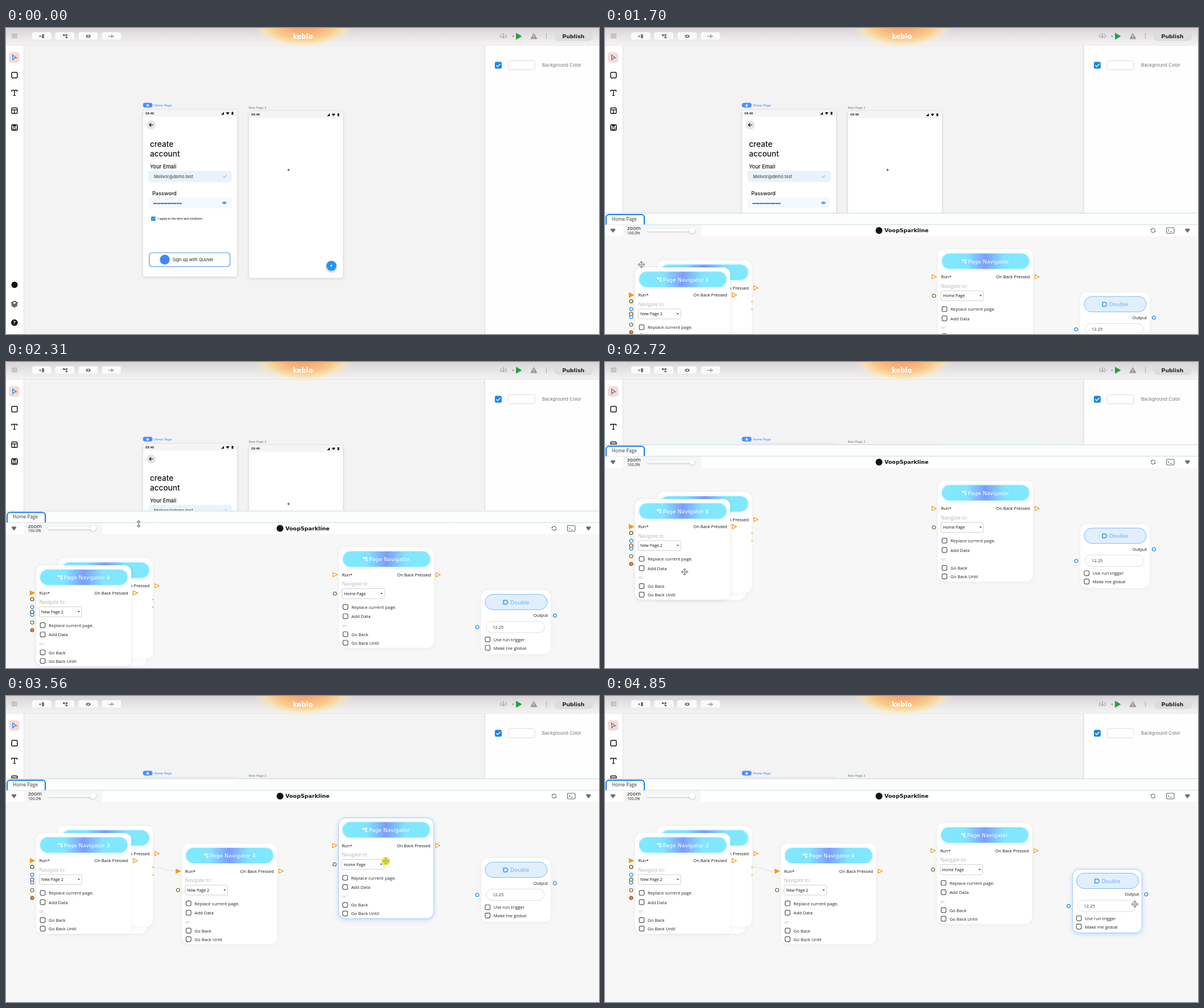
An HTML page with a canvas that plays this animation: 1042 by 538 pixels, repeating every 4.92 s.

```html
<!DOCTYPE html>
<html lang="en">
<head>
<meta charset="utf-8">
<title>Page builder</title>
<style>
html, body { margin: 0; width: 100%; height: 100%; overflow: hidden; background: #f3f3f3; }
canvas { display: block; width: 100vw; height: 100vh; }
</style>
</head>
<body>
<canvas id="stage" width="1042" height="538"></canvas>
<script>
const W = 1042, H = 538, LOOP = 4920, TAU = Math.PI * 2;
const UI = '"Open Sans", sans-serif', APP = 'Inter, sans-serif', WIDE = '"DejaVu Sans", sans-serif';
const BLUE = '#1a86e8', ORANGE = '#f59a12', INK = '#111', GREY = '#8a8a8a';
const screen = document.getElementById('stage').getContext('2d');
const backdrop = document.createElement('canvas');
backdrop.width = W;
backdrop.height = H;
let g = backdrop.getContext('2d');

// y is the middle of the capital letters
function text(s, x, y, size, { color = INK, font = UI, weight = 400, align = 'left' } = {}) {
  g.font = `${weight} ${size}px ${font}`;
  g.fillStyle = color;
  g.textAlign = align;
  g.fillText(s, x, y + size * 0.36);
}
function paint(fill, stroke, width = 1) {
  if (fill) { g.fillStyle = fill; g.fill(); }
  if (stroke) { g.strokeStyle = stroke; g.lineWidth = width; g.stroke(); }
}
function box(x, y, w, h, r, fill, stroke, width) {
  g.beginPath();
  g.roundRect(x, y, w, h, r);
  paint(fill, stroke, width);
}
function disc(x, y, r, fill, stroke, width) {
  g.beginPath();
  g.arc(x, y, r, 0, TAU);
  paint(fill, stroke, width);
}
function path(points, { fill, stroke, width, close = false } = {}) {
  g.beginPath();
  points.forEach(([x, y]) => g.lineTo(x, y));
  if (close) g.closePath();
  paint(fill, stroke, width);
}
const line = (points, stroke = INK, width = 1) => path(points, { stroke, width });
const shape = (points, fill, stroke, width) => path(points, { fill, stroke, width, close: true });
function at(x, y, draw) {
  g.save();
  g.translate(x, y);
  draw();
  g.restore();
}
function shadowed(color, blur, dy, draw) {
  g.save();
  g.shadowColor = color;
  g.shadowBlur = blur;
  g.shadowOffsetY = dy;
  draw();
  g.restore();
}
function plus(x, y, r, color, width) {
  line([[x - r, y], [x + r, y]], color, width);
  line([[x, y - r], [x, y + r]], color, width);
}
function tick(x, y, r, color, width = 1.3) {
  line([[x - r, y], [x - r * 0.3, y + r * 0.7], [x + r, y - r * 0.7]], color, width);
}

function nodesIcon(color) {
  line([[-2.5, -2], [2.5, -2]], color, 0.9);
  line([[-2.5, -2], [2.2, 2.2]], color, 0.9);
  for (const [x, y] of [[-4, -3.5], [0.8, -3.5], [0.8, 0.8]]) box(x, y, 3.2, 3, 0.8, color);
}

function topBar() {
  const shade = g.createLinearGradient(0, 0, 0, 30);
  shade.addColorStop(0, '#d8d3d7');
  shade.addColorStop(0.5, '#e7e4e6');
  shade.addColorStop(1, '#f4f3f3');
  g.fillStyle = shade;
  g.fillRect(0, 0, W, 30);
  g.fillStyle = '#e2e2e2';
  g.fillRect(0, 30, W, 0.8);

  at(523, -8, () => {
    g.scale(1, 0.48);
    const sun = g.createRadialGradient(0, 0, 0, 0, 0, 92);
    sun.addColorStop(0, '#ef9a6e');
    sun.addColorStop(0.35, '#f5b27c');
    sun.addColorStop(0.6, '#f8c98c');
    sun.addColorStop(0.78, 'rgba(251,224,165,.75)');
    sun.addColorStop(0.9, 'rgba(252,236,195,.25)');
    sun.addColorStop(1, 'rgba(252,238,205,0)');
    g.fillStyle = sun;
    g.fillRect(-95, 16, 190, 100);
  });
  text('keblo', 521.5, 15, 11.5, { color: '#fff', font: WIDE, weight: 700, align: 'center' });

  for (const y of [11, 14, 17]) line([[10, y], [20, y]], GREY, 1);
  for (const x of [46, 86.5, 127.5, 168.5]) box(x, 7.5, 33.5, 13, 3, '#fbfafa');
  plus(60, 14.5, 2, '#666', 1);
  box(63, 11, 4, 7, 1, '#777');
  at(104, 14.5, () => nodesIcon('#666'));
  g.beginPath();
  g.ellipse(144.5, 14.5, 4.2, 2.8, 0, 0, TAU);
  paint('#777');
  disc(144.5, 14.5, 1.2, '#fff');
  line([[180, 14.5], [190, 14.5]], '#777', 1);
  line([[186, 11], [186, 18]], '#777', 1);

  line([[871, 11], [868, 14.5], [871, 18]], GREY, 1);
  line([[877, 11], [880, 14.5], [877, 18]], GREY, 1);
  line([[874, 9], [874, 17]], GREY, 1);
  line([[871.5, 14.5], [874, 17.5], [876.5, 14.5]], GREY, 1);
  disc(891, 14.5, 1.3, GREY);
  shape([[896.5, 9], [906, 14.5], [896.5, 20]], '#1da53c', '#1da53c', 0.8);
  shape([[927.5, 9.5], [933, 19], [922, 19]], '#999', '#999', 1);
  line([[927.5, 12.5], [927.5, 16]], '#fff', 1);
  disc(927.5, 17.6, 0.6, '#fff');
  line([[949.5, 9], [949.5, 19.5]], '#aaa', 1);
  box(963.5, 6, 68, 17, 8.5, '#dedddd');
  text('Publish', 997, 14.7, 9.4, { color: '#222', font: WIDE, weight: 700, align: 'center' });
}

function sidebars() {
  g.fillStyle = '#fff';
  g.fillRect(0, 30, 31, H);
  g.fillStyle = '#fefefe';
  g.fillRect(841, 30, 201, H);
  line([[31.5, 30], [31.5, H]], '#e0e0e0');
  line([[841, 30], [841, H]], '#cfcfcf');

  box(5, 42.5, 18.5, 18.5, 5, '#fbd9d0');
  shape([[11.5, 47.5], [18.5, 52.5], [14.7, 53], [12, 56]], null, BLUE, 1.2);
  box(10, 78, 9.8, 9.8, 1.5, null, INK, 1.5);
  line([[10, 112], [10, 109.5], [19.5, 109.5], [19.5, 112]], INK, 1.3);
  line([[14.8, 109.5], [14.8, 118.5]], INK, 1.4);
  line([[12.5, 118.5], [17, 118.5]], INK, 1.2);
  box(10, 140.5, 9.8, 9.8, 1.5, null, INK, 1.4);
  line([[10, 144], [19.8, 144]], INK, 1.3);
  line([[14.8, 144], [14.8, 150]], INK, 1.3);
  box(10, 170, 9.8, 9.8, 1.8, null, INK, 1.6);
  box(12.3, 170.5, 5, 3, 0.5, INK);
  box(12.3, 175.5, 5, 3, 0.5, null, INK, 1);
  disc(15, 451.5, 5.5, INK);
  shape([[14.8, 480.5], [20, 483.3], [14.8, 486], [9.6, 483.3]], null, INK, 1.2);
  for (const y of [485.5, 487.7]) line([[9.6, y], [14.8, y + 2.8], [20, y]], INK, 1.2);
  disc(14.8, 518, 5.8, INK);
  text('?', 14.8, 518, 8.5, { color: '#fff', weight: 700, align: 'center' });

  box(859, 59.5, 12, 12, 2.5, BLUE);
  tick(865, 65.5, 3.6, '#fff', 1.5);
  box(882.5, 57.5, 47, 16, 3, '#fff', '#dcdcdc');
  text('Background Color', 942, 65.5, 8.1, { color: '#777', font: APP });
}

function phone(x, y) {
  shadowed('rgba(0,0,0,.16)', 5, 1, () => box(x, y, 165, 293, 4, '#fff'));
  box(x, y, 165, 12, [4, 4, 0, 0], '#f5f5f5');
  text('08:46', x + 4, y + 6, 5.2, { font: APP, weight: 600 });
  shape([[x + 137, y + 8.5], [x + 142, y + 8.5], [x + 142, y + 3.5]], INK);
  shape([[x + 145.5, y + 4.8], [x + 148.5, y + 3.8], [x + 151.5, y + 4.8], [x + 148.5, y + 8.6]], INK);
  box(x + 155.5, y + 3.6, 3, 5, 0.6, INK);
}

function pages() {
  box(240.5, 131.5, 17, 8.3, 4.1, '#4a8ffc');
  shape([[249, 133.2], [251.5, 135.4], [251, 138], [247, 138], [246.5, 135.4]], '#cfe1ff');
  text('Home Page', 260, 136, 5.5, { color: '#3b83f6', font: WIDE });
  text('New Page 2', 426.5, 140, 5.3, { color: '#777', font: WIDE });
  phone(241, 144);
  phone(427, 146.5);

  const title = { font: APP, weight: 500 };
  disc(255, 170.5, 8, '#e5e5e5');
  line([[258.5, 170.5], [252, 170.5]], INK, 1.1);
  line([[255, 167.5], [252, 170.5], [255, 173.5]], INK, 1.1);
  text('create', 253, 204.6, 13.6, title);
  text('account', 253, 221.6, 13.6, title);
  text('Your Email', 253, 243.5, 9.2, title);
  box(250, 251, 147, 20, 5, '#eaf3fb');
  text('Melivor@demo.test', 260, 261, 7.5, { color: '#333', font: APP });
  tick(384.3, 261, 3, '#5c9fd8', 1);
  text('Password', 257, 291, 9.1, title);
  box(250, 298, 147, 19, 5, '#f5f9fd');
  text('*'.repeat(16), 259, 309.3, 8, { color: '#333', font: '"Liberation Sans", sans-serif', weight: 700 });
  g.beginPath();
  g.ellipse(383.8, 307.3, 4, 2.6, 0, 0, TAU);
  paint('#82b4e2');
  disc(383.8, 307.3, 1.2, '#4d8fcb');
  box(255, 331.5, 7.5, 7.5, 0.8, BLUE);
  tick(258.7, 335.2, 2.2, '#fff', 1);
  text('I agree to the term and condition.', 267, 335.3, 5.4, { font: '"Roboto", sans-serif' });
  box(251.7, 395, 142, 24.5, 5, '#fff', '#4b93e6', 1.2);
  disc(279, 407.2, 8.6, '#4285f4');
  text('Sign up with Quovel', 292.5, 407.3, 7.6, { font: APP, color: '#222' });

  plus(496.5, 249.5, 2.3, '#333', 0.9);
  shadowed('rgba(0,0,0,.3)', 4, 2, () => disc(571.8, 418, 8.8, '#2196f3'));
  plus(571.8, 418, 2.3, '#fff', 1);
}

function triangle(x, y, filled) {
  shape([[x, y - 3.6], [x + 7.5, y], [x, y + 3.6]], filled ? ORANGE : '#fffdf7', ORANGE, 1.2);
}
function port(x, y, color, fill = '#fff') {
  disc(x, y, 2.9, fill, color, 1.3);
}
function option(label, x, y) {
  box(x - 4.3, y - 4.3, 8.6, 8.6, 2.4, '#fff', '#555', 1.2);
  text(label, x + 10.5, y + 0.3, 7.8, { color: '#222' });
}
function card(x, y, w, h, selected) {
  shadowed(selected ? 'rgba(60,130,255,.3)' : 'rgba(0,0,0,.05)', 8, selected ? 2 : 1,
    () => box(x, y, w, h, 12, '#fff'));
  if (selected) box(x, y, w, h, 12, null, '#9cc6fb', 0.9);
}

function navigator(x, y, name, page, { wired = false, selected = false } = {}) {
  at(x, y, () => {
    card(0, 0, 167, 177, selected);
    const glow = g.createLinearGradient(7, 0, 160, 0);
    glow.addColorStop(0, '#80e9ff');
    glow.addColorStop(0.28, '#80e5ff');
    glow.addColorStop(0.5, '#7d9dfd');
    glow.addColorStop(0.72, '#80e5ff');
    glow.addColorStop(1, '#80e9ff');
    shadowed('rgba(90,210,255,.4)', 4, 0, () => box(7, 7.5, 153.5, 27, 13.5, glow));
    const titleX = name.length > 14 ? 49 : 53;
    at(titleX - 6.8, 21, () => nodesIcon('#fff'));
    text(name, titleX, 21.2, 9.4, { color: '#fff', font: WIDE });

    triangle(-10.5, 48.5, wired);
    triangle(170.5, 48.5);
    text('Run*', 5.5, 48.5, 7.6);
    text('On Back Pressed', 161.5, 48.5, 7.6, { align: 'right' });
    text('Navigate to:', 5.5, 64.5, 8.4, { color: '#b5b5b5' });
    box(5.5, 73, 74.5, 17.5, 2, '#fff', '#d2d2d2', 1);
    text(page, 9, 81.7, 7.15);
    shape([[73, 80.5], [77, 80.5], [75, 83]], '#444');
    port(-7, 81.7, '#8a6d3b');
    option('Replace current page.', 11.5, 105.2);
    option('Add Data', 11.5, 121.5);
    text('or:', 5.5, 137.5, 7.9, { color: '#b5b5b5' });
    option('Go Back', 11.5, 153);
    option('Go Back Until', 11.5, 168);
  });
}

function doubleNode(x, y, selected) {
  at(x, y, () => {
    card(0, 0, 122, 112, selected);
    box(7, 7, 109, 27, 13.5, '#e1effd', '#6fb1f5', 0.9);
    g.beginPath();
    g.roundRect(39.3, 17.3, 7.2, 7, [0.5, 3.5, 3.5, 0.5]);
    paint(null, '#4a9ff5', 1.8);
    text('Double', 51, 20.8, 9.4, { color: '#68adf6', font: WIDE });
    text('Output', 117, 44, 7.6, { align: 'right' });
    port(129.5, 44.3, '#2b93f3', '#e8f4ff');
    port(-7, 64.7, '#2b93f3', '#e8f4ff');
    box(9, 54.5, 102, 20, 10, '#fff', '#dedede', 1);
    text('12.25', 20, 64.6, 7.6, { color: '#333' });
    option('Use run trigger', 11.3, 86.3);
    option('Make me global', 11.3, 101);
  });
}

function lightningHeader() {
  g.fillStyle = '#fcfefe';
  g.fillRect(0, 0, W, 21);
  g.fillStyle = '#fff';
  g.fillRect(0, 21, W, 20);
  g.fillStyle = '#f6f6f6';
  g.fillRect(32, 21, 137, 20);
  line([[0, 0.5], [W, 0.5]], '#cbd8de');
  line([[0, 20.8], [W, 20.8]], '#cbdcdf');
  g.beginPath();
  g.moveTo(2, 20.5);
  g.arcTo(2, 3, 8, 3, 5);
  g.arcTo(69, 3, 69, 9, 5);
  g.lineTo(69, 20.5);
  paint('#fff', '#1677f0', 2);
  text('Home Page', 12, 11, 8.2, { color: '#333' });

  for (const x of [14, 1023.5]) {
    g.beginPath();
    g.moveTo(x - 4.5, 29.5);
    g.quadraticCurveTo(x - 2.5, 26.5, x, 28);
    g.quadraticCurveTo(x + 2.5, 26.5, x + 4.5, 29.5);
    g.lineTo(x, 35);
    g.closePath();
    paint('#707070');
  }
  text('zoom', 39, 27, 8.7, { color: '#222', font: WIDE });
  text('100.0%', 39, 35.5, 6.7, { color: '#222' });
  shadowed('rgba(0,0,0,.2)', 3, 1, () => {
    box(74, 28.5, 84, 4, 2, '#fff');
    disc(153, 30.5, 5.2, '#fff');
  });
  disc(481.5, 31, 6, INK);
  text('VoopSparkline', 491, 31, 9.5, { font: WIDE, weight: 700 });
  for (const start of [0.4, 0.4 + Math.PI]) {
    g.beginPath();
    g.arc(963, 31, 3.6, start, start + 2.5);
    paint(null, '#666', 1.1);
    disc(963 + 3.6 * Math.cos(start), 31 + 3.6 * Math.sin(start), 1.1, '#666');
  }
  box(986.5, 26, 13.5, 10, 1.5, null, '#666', 1.1);
  line([[989, 28.8], [991, 31], [989, 33.2]], '#666', 1);
  line([[992.5, 33.2], [996, 33.2]], '#666', 1);
}

// Times in ms, then values; linear between rows
function track(rows, t) {
  const next = rows.findIndex(r => r[0] > t);
  if (next < 0) return rows[rows.length - 1].slice(1);
  if (next === 0) return rows[0].slice(1);
  const a = rows[next - 1], b = rows[next], k = (t - a[0]) / (b[0] - a[0]);
  return a.slice(1).map((v, i) => v + (b[i + 1] - v) * k);
}
const panelTrack = [[1220, 538], [1350, 325], [1830, 325], [1960, 294], [2020, 294], [2240, 272],
  [2310, 262], [2560, 145]];
const pointerTrack = [[130, 636, 402], [610, 68, 518], [670, 78, 460], [1000, 15, 452], [1220, 15, 452],
  [1640, 64, 416], [1755, 64, 416], [1830, 233, 348], [1960, 233, 317], [2020, 233, 317], [2240, 233, 295],
  [2310, 233, 285], [2560, 233, 168], [2715, 140, 369], [2860, 140, 369], [3060, 396, 387.5],
  [3150, 581, 360], [3190, 581, 360], [3350, 672, 400], [3480, 668, 285], [3700, 666.4, 299.5],
  [3900, 907, 339], [3970, 907, 339], [4110, 900, 344], [4160, 900, 344], [4250, 893.5, 358.5],
  [4440, 671, 288], [4510, 671, 288], [4845, 931, 366]];
const fourthTrack = [[2860, 53, 241], [3060, 309.3, 259.5]];
const pageTrack = [[3480, 585, 209], [3700, 583.4, 223.5]];
const doubleTrack = [[3970, 835, 285], [4110, 828, 290], [4160, 828, 290], [4250, 821.5, 304.5]];
const within = (t, ...spans) => spans.some(([a, b]) => t >= a && t < b);

function graph(t) {
  const [x4, y4] = track(fourthTrack, t);
  const [px, py] = track(pageTrack, t);
  const [dx, dy] = track(doubleTrack, t);

  card(80, 262, 167, 156);
  navigator(91, 228.5, 'Page Navigator 2', 'New Page 2');
  for (const y of [301, 314.5]) box(257.5, y - 1.3, 1.6, 2.6, 0.6, ORANGE);
  if (t > 2860) {
    g.beginPath();
    g.moveTo(259, 301);
    g.bezierCurveTo(280, 301, 278, y4 + 48.5, x4 - 10, y4 + 48.5);
    paint(null, '#e9e0cd', 1.2);
  }
  navigator(53, 241, 'Page Navigator 3', 'New Page 2', { wired: true });
  port(46, 300.5, '#5d5320');
  port(46, 314.3, '#2b93f3', '#e8f4ff');
  port(46, 328, '#2b93f3', '#e8f4ff');
  port(46, 322.8, '#8a6d3b');
  port(46, 341.5, '#80702d');
  port(46, 355, '#9a5b2c', '#d98a56');
  navigator(px, py, 'Page Navigator', 'Home Page', { selected: within(t, [3480, 3970]) });
  doubleNode(dx, dy, t >= 3970);
  navigator(x4, y4, 'Page Navigator 4', 'New Page 2', { wired: true, selected: within(t, [2860, 3480]) });
}

function moveCursor() {
  for (let i = 0; i < 4; i++) {
    line([[0, 0], [0, -5]], '#555', 2);
    shape([[-2.3, -3.7], [0, -6], [2.3, -3.7]], '#fff', '#555', 0.8);
    g.rotate(TAU / 4);
  }
  plus(0, 0, 3.8, '#fff', 0.9);
}
function resizeCursor() {
  line([[0, -4], [0, 4]], '#444', 2.2);
  for (const s of [-1, 1]) shape([[-2.8, 3.4 * s], [0, 6.4 * s], [2.8, 3.4 * s]], '#fff', '#444', 0.9);
  line([[0, -4], [0, 4]], '#fff', 0.9);
}
function arrowCursor() {
  shape([[0, 0], [0, 9], [2, 7.2], [3.4, 10.2], [4.8, 9.6], [3.4, 6.6], [6, 6.3]], '#fff', '#333', 0.8);
}
function pressedCursor() {
  disc(0, 0, 7.5, '#f6ea3c');
  g.globalAlpha = 0.5;
  moveCursor();
}

function pointer(t) {
  if (t < 130) return;
  const [x, y] = track(pointerTrack, t);
  const pressed = within(t, [1060, 1200], [2860, 3060], [3480, 3700], [3970, 4250]);
  const resizing = within(t, [1780, 2600]);
  const moving = within(t, [1400, 1780], [2600, 3080], [3420, 3720], [3850, 4270], [4750, LOOP]);
  at(x, y, pressed ? pressedCursor : resizing ? resizeCursor : moving ? moveCursor : arrowCursor);
}

function render(t) {
  g.clearRect(0, 0, W, H);
  g.drawImage(backdrop, 0, 0);
  const [top] = track(panelTrack, t);
  if (top < H) {
    at(0, top, () => {
      g.fillStyle = '#f7f7f7';
      g.fillRect(0, 0, W, H);
      at(0, -145, () => graph(t));
      lightningHeader();
    });
  }
  pointer(t);
}

g.fillStyle = '#f3f3f3';
g.fillRect(0, 0, W, H);
pages();
sidebars();
topBar();
g = screen;

const began = performance.now();
function advance() {
  render((performance.now() - began) % LOOP);
  requestAnimationFrame(advance);
}
advance();
</script>
</body>
</html>
```
